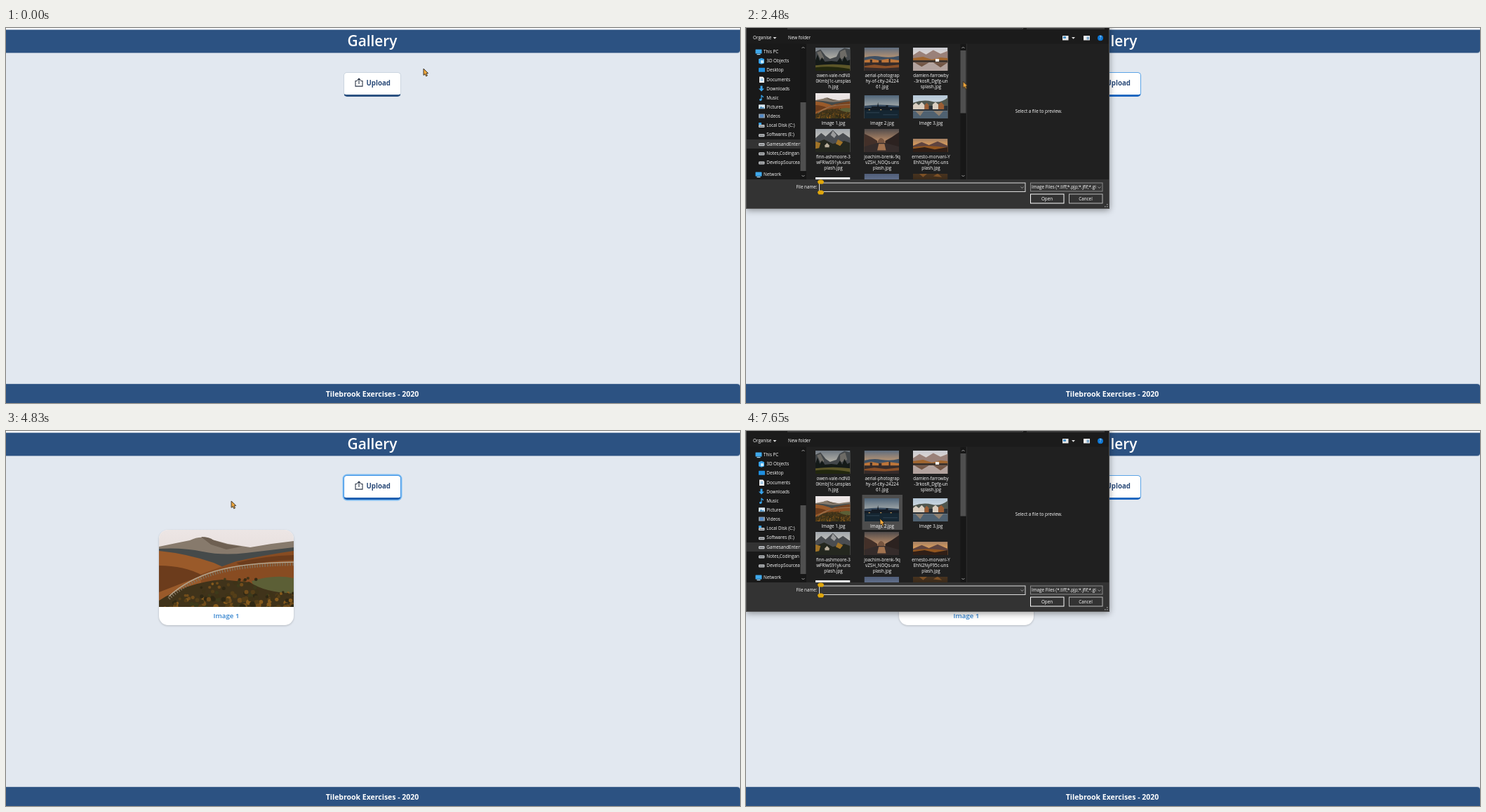
An HTML page for the animation above (8000 ms loop, 1046x535 px).

```html
<!DOCTYPE html>
<html lang="en">
<head>
<meta charset="utf-8">
<title>Gallery</title>
<style>
html, body { margin: 0; width: 100%; height: 100%; overflow: hidden; }
body { position: relative; background: #e2e8f0; font-family: "Open Sans", "Noto Sans", sans-serif; }
body > * { position: absolute; box-sizing: border-box; }
.strip { left: 0; top: 0; width: 100%; height: 3px; background: #f7f9fb; }
header, footer { left: 0; width: 1046px; background: #2c5282; color: #fff; text-align: center; padding-right: 2px; }
header { top: 3px; height: 32px; border-radius: 0 0 4px 0; font: 600 20.8px/30px "Open Sans", sans-serif;
  box-shadow: 0 1px rgba(44,82,130,.5), 0 -1px rgba(44,82,130,.5); }
footer { top: 508px; height: 27px; border-radius: 0 4px 0 0; font: 700 10.5px/28px "Open Sans", sans-serif;
  box-shadow: 0 -1px rgba(44,82,130,.2); }
.btn { left: 481px; top: 63px; width: 82px; height: 35px; border: 1px solid #cbd5e0; border-bottom: 3px solid #2c5282;
  border-radius: 5px; background: #fff; color: #2a4a78; font: 700 9.7px/30px "Open Sans", sans-serif; padding-left: 31.5px; }
.btn svg { position: absolute; left: 15px; top: 7px; }
.card { left: 218px; top: 141px; width: 192px; height: 136px; border-radius: 13px; overflow: hidden; background: #fff;
  box-shadow: 0 1px 3px rgba(0,0,0,.2); color: #3182ce; text-align: center; font: 600 9.7px/26px "Open Sans", sans-serif; }
.card svg { display: block; }
.dialog { left: 0; top: -20px; width: 518px; height: 278px; transform-origin: 259px 95px; box-shadow: 0 2px 9px rgba(0,0,0,.4); }
.dialog svg { display: block; }
.dialog text { font: 6.3px "Open Sans", "Noto Sans", sans-serif; fill: #fff; }
.mouse { left: 0; top: 0; overflow: visible; animation: move 8s linear -10ms infinite; }

/* hard state changes share one 8 s clock */
.on { animation: 8s step-end -10ms infinite; }
.n-btn { animation-name: btn; } .n-card { animation-name: card; } .n-win { animation-name: win; }
.n-blank { animation-name: blank; } .n-ph { animation-name: ph; } .n-late { animation-name: late; }
.n-row { animation-name: row; } .n-sel { animation-name: sel; } .n-unsel { animation-name: unsel; }
.n-hov1 { animation-name: hov1; } .n-hov2 { animation-name: hov2; } .n-caret { animation-name: caret; }
.n-hand { animation-name: hand; } .n-arrow { animation-name: arrow; }

@keyframes btn {
  0% { border-color: #cbd5e0 #cbd5e0 #2c5282; box-shadow: none; }
  9.25% { border-color: #5ba3e6 #5ba3e6 #1f68c0; box-shadow: none; }
  17.25% { border-color: #4295e6 #4295e6 #1f5fb0; box-shadow: 0 0 0 1.5px #7cbcf2; }
  25.625% { border-color: #5ba3e6 #5ba3e6 #1f68c0; box-shadow: none; }
  57.75% { border-color: #4295e6 #4295e6 #1f5fb0; box-shadow: 0 0 0 1.5px #7cbcf2; }
  84.125%, to { border-color: #5ba3e6 #5ba3e6 #1f68c0; box-shadow: none; }
}
@keyframes card { 0% { opacity: 0 } 58.75%, to { opacity: 1 } }
@keyframes win {
  0% { opacity: 0; transform: scale(.979) }
  25.625% { opacity: .6; transform: scale(.979) }
  26.5% { opacity: .845; transform: scale(.9923) }
  27.25% { opacity: 1; transform: none }
  56.5% { opacity: .57; transform: scale(.979) }
  57.75% { opacity: 0; transform: scale(.979) }
  84.125% { opacity: .6; transform: scale(.979) }
  85% { opacity: .845; transform: scale(.9923) }
  86.125%, to { opacity: 1; transform: none }
}
@keyframes blank { 0% { opacity: 1 } 26.5% { opacity: 0 } 84.125% { opacity: 1 } 85%, to { opacity: 0 } }
@keyframes ph { 0% { opacity: 1 } 27.25% { opacity: 0 } 84.125% { opacity: 1 } 86.125%, to { opacity: 0 } }
@keyframes late { 0% { opacity: 0 } 28.25% { opacity: 1 } 84.125% { opacity: 0 } 87.25%, to { opacity: 1 } }
@keyframes row {
  0% { transform: translateY(var(--k)) } 28.25% { transform: none }
  84.125% { transform: translateY(var(--k)) } 87.25%, to { transform: none }
}
@keyframes sel { 0% { opacity: 0 } 54.375% { opacity: 1 } 84.125%, to { opacity: 0 } }
@keyframes unsel { 0% { opacity: 1 } 54.375% { opacity: 0 } 84.125%, to { opacity: 1 } }
@keyframes hov1 { 0% { opacity: 0 } 46.25% { opacity: 1 } 54.375% { opacity: 0 } 88.75% { opacity: 1 } 93.75%, to { opacity: 0 } }
@keyframes hov2 { 0% { opacity: 0 } 36.25% { opacity: 1 } 46.25% { opacity: 0 } 93.75%, to { opacity: 1 } }
@keyframes caret { 0% { opacity: 0 } 40% { opacity: 1 } 46.6% { opacity: 0 } 87.25% { opacity: 1 } 93.75%, to { opacity: 0 } }
@keyframes hand { 0% { opacity: 0 } 9.25% { opacity: 1 } 21.25% { opacity: 0 } 66.5% { opacity: 1 } 78.6%, to { opacity: 0 } }
@keyframes arrow { 0% { opacity: 1 } 9.25% { opacity: 0 } 21.25% { opacity: 1 } 66.5% { opacity: 0 } 78.6%, to { opacity: 1 } }
@keyframes move {
  0%, .875% { transform: translate(595px, 58px) }
  3.75% { transform: translate(590px, 21px) }
  7.5% { transform: translate(558px, 46px) }
  10.25%, 11.25% { transform: translate(539px, 83px) }
  13.25%, 18.25% { transform: translate(540px, 75px) }
  26.5%, 27.25% { transform: translate(378px, 65px) }
  38%, 39% { transform: translate(188px, 96px) }
  41.875%, 44.75% { transform: translate(177px, 129px) }
  48.75%, 52.4% { transform: translate(127px, 117px) }
  52.5%, 54.375% { transform: translate(132px, 119px) }
  55%, 57.75% { transform: translate(132px, 122px) }
  64.25%, 65.5% { transform: translate(577px, 70px) }
  70.25%, 77.1% { transform: translate(541px, 72px) }
  84.125%, 85% { transform: translate(248px, 72px) }
  89.75%, 92% { transform: translate(130px, 115px) }
  95.625%, to { transform: translate(191px, 125px) }
}
</style>
</head>
<body>
<svg id="art" width="0" height="0"></svg>
<div class="strip"></div>
<header>Gallery</header>
<footer>Tilebrook Exercises - 2020</footer>
<div class="btn on n-btn">
  <svg width="12" height="14" fill="none" stroke="#2d3748" stroke-width="1.1"><path d="M3.6 4.5H1v7.6h10V4.5H8.4M6 9V1.2M3.5 3.6L6 1.1 8.5 3.6"/></svg>Upload
</div>
<div class="card on n-card"><svg width="192" height="110"><use href="#valley" width="192" height="110"/></svg>Image 1</div>
<div class="dialog on n-win"><svg id="dlg" width="518" height="278" viewBox="0 -20 518 278"></svg></div>
<svg class="mouse" width="1" height="1" stroke="#2b2620" stroke-width=".9" stroke-linejoin="round">
  <path class="on n-arrow" fill="#f2a83c" d="M0 0V9.4L2.2 7.5 3.7 10.8 5.4 10 4 6.8 6.6 6.5Z"/>
  <path class="on n-hand" fill="#f4b722" d="M-1.2 1.2a1.1 1.1 0 0 1 2.2 0v4l3.2.8q1.4.4 1.1 2l-.9 4.8h-5L-4 8.4q.2-1.5 1.4-.7l1.4 1z"/>
</svg>
<script>
const get = id => document.getElementById(id);
const rect = (x, y, w, h, fill, more = '') => `<rect x="${x}" y="${y}" width="${w}" height="${h}" fill="${fill}" ${more}/>`;
const path = (fill, d, more = '') => `<path fill="${fill}" d="${d}" ${more}/>`;
const line = (color, d, w = 1) => path('none', d, `stroke="${color}" stroke-width="${w}"`);
const text = (x, mid, s, anchor = 'start') => `<text x="${x}" y="${mid + 2.2}" text-anchor="${anchor}">${s}</text>`;
const state = (name, body, style = '') => `<g class="on n-${name}" style="${style}">${body}</g>`;
const use = (id, x, y, w, h) => `<use href="#${id}" x="${x}" y="${y}" width="${w}" height="${h}"/>`;

/* pictures: a sky gradient with flat shapes on it */
const scene = (id, w, h, top, low, body) =>
  `<linearGradient id="${id}-sky" x2="0" y2="1"><stop stop-color="${top}"/><stop offset=".6" stop-color="${low}"/></linearGradient>
  <symbol id="${id}" viewBox="0 0 ${w} ${h}" preserveAspectRatio="xMidYMid slice">${rect(0, 0, w, h, `url(#${id}-sky)`)}${body}</symbol>`;
const thumb = (id, top, low, ...layers) => scene(id, 48, 33, top, low, layers.map(l => path(...l)).join(''));

let seed = 7;
const rnd = () => (seed = seed * 16807 % 2147483647) / 2147483647;

function trees(n) {
  const tones = ['#2e2714', '#3f3318', '#574019', '#77501c', '#90601f', '#3d3b1c'];
  let out = '';
  for (let i = 0; i < n; i++) {
    const x = rnd() * 192;
    const edge = x > 140 ? 106 : 74 + 49 * ((192 - x) / 178) ** 2.2;
    const depth = rnd();
    const tone = tones[Math.floor(rnd() * 6)];
    out += `<circle cx="${x.toFixed(1)}" cy="${(edge + depth * (144 - edge)).toFixed(1)}" r="${(1.8 + depth * 3).toFixed(1)}" fill="${tone}"/>`;
  }
  return `<g opacity=".9">${out}</g>`;
}

const bridge = 'M14 112Q40 88 80 76T192 63';
get('art').innerHTML =
  scene('valley', 192, 144, '#efe9e9', '#e2d8d4',
    path('#877a6c', 'M0 41L24 36 44 32Q60 24 76 31L98 37 130 42 160 37 192 33V80H0Z') +
    path('#6e6052', 'M60 27Q72 27 78 32L98 38 118 41 96 45 74 38Z') +
    path('#454a4a', 'M0 44Q34 42 62 48T124 50L192 42V90H0Z') +
    path('#9a5a2a', 'M0 47Q40 51 78 64L100 74V144H0Z') +
    path('#884c22', 'M192 47Q150 53 110 62L60 80V144H192Z') +
    path('#6c3c1c', 'M0 68Q36 68 62 82L0 106ZM110 64Q150 54 192 53V60Q150 61 120 70Z') +
    path('#5c5f36', 'M132 90Q165 80 192 86V112H140Z') +
    path('#40331a', 'M0 118Q40 92 90 88L130 92Q150 106 192 108V144H0Z') +
    `<g transform="translate(0 3)">${path('none', bridge, 'stroke="#80715c" stroke-width="4.5" stroke-dasharray="1.4 2.2"')}</g>` +
    line('#b5a58d', bridge, 1.4) + trees(230)) +
  thumb('cliff', '#6d7680', '#c2bdb0', ['#43474a', 'M0 6L7 3 14 12 20 16 29 13 33 5 40 1 48 3V33H0Z'], ['#6d6b66', 'M2 7L7 5 12 15 8 19ZM34 6L41 3 44 13 34 17Z'],
    ['#141a18', 'M0 18L3 10 6 19 9 14 13 20 22 19 30 20 34 14 37 20 40 12 44 19 48 17V27H0Z'], ['#5c5628', 'M0 25Q24 22 48 25V33H0Z'], ['#22270f', 'M0 28Q20 25 48 30V33H0Z']) +
  thumb('city', '#5b6c80', '#d8a06b', ['#3f5063', 'M0 14Q12 11 24 13T48 12V22H0Z'], ['#bd7539', 'M0 18L10 16 20 18 33 16 48 18V24H0Z'],
    ['#352b2a', 'M0 21H8V17H11V21H20V18H24V21H34V16H36V21H48V33H0Z'], ['#8a5029', 'M0 26L14 24 30 26 48 24V28L28 29 0 28Z']) +
  thumb('lake', '#c9cbd2', '#eddcd0', ['#9a8179', 'M0 11L9 5 18 10 28 4 38 9 48 5V20H0Z'], ['#a0662f', 'M0 15L14 13 26 17 38 14 48 15V20H0Z'],
    ['#40352e', 'M0 18H48V21H0Z'], ['#b3a39e', 'M0 21H48V33H0Z'], ['#735645', 'M2 21H22L12 27ZM28 21H48L38 28Z'], ['#f2eee9', 'M31 16H36V20H31Z']) +
  thumb('harbor', '#4d6378', '#b3b6b2', ['#33465a', 'M0 15Q20 12 48 15V21H0Z'], ['#141c25', 'M0 18H10V16H18L19 10 20 16H30V14H33V17H48V22H0Z'],
    ['#152632', 'M0 21H48V33H0Z'], ['#2c4252', 'M3 24H21V25H3ZM26 27H46V28H26Z'], ['#c49a5a', 'M6 20H8V21H6ZM22 20H24V21H22ZM36 20H38V21H36Z']) +
  thumb('houses', '#b3c6d6', '#dce2e6', ['#4f564e', 'M0 11Q14 6 26 9T48 4V20H0Z'], ['#d9cec0', 'M0 14L4 11 8 14 12 10 16 14V21H0ZM27 13L31 10 35 13V21H27Z'],
    ['#9a5d34', 'M16 14L19 11 22 14V21H16ZM35 13L39 10 43 14V21H35Z'], ['#2a3036', 'M22 15H27V21H22ZM43 15H48V21H43ZM0 20H48V22H0Z'],
    ['#4f6171', 'M0 22H48V33H0Z'], ['#90806f', 'M3 22H15L10 29ZM28 22H42L36 29Z']) +
  thumb('alps', '#9fa5ab', '#d5d0c6', ['#4a4d51', 'M0 13L8 6 14 11 24 2 32 10 38 6 48 13V33H0Z'], ['#9a9b9c', 'M24 3L29 9 26 13 21 9Z'],
    ['#24271f', 'M0 20L12 15 24 21 40 17 48 20V33H0Z'], ['#a07327', 'M31 15L38 19 34 24 28 21ZM0 18L7 20 5 27 0 28Z'], ['#b9ae9c', 'M13 23L16 20 19 23V26H13Z']) +
  thumb('canal', '#4e4a4b', '#c4926a', ['#433029', 'M0 7L10 12 18 17V28H0Z'], ['#2c2220', 'M48 5L38 12 29 17V28H48Z'], ['#775540', 'M19 17Q23 9 28 17V20H18Z'],
    ['#352c2b', 'M0 25L18 20H29L48 25V33H0Z'], ['#a27350', 'M20 21H28L30 30H18Z']) +
  thumb('dusk', '#7b6a6c', '#eda757', ['#5f443f', 'M0 17L12 12 22 16 34 11 48 17V33H0Z'], ['#93561f', 'M0 19Q20 15 48 20V33H0Z'], ['#301f17', 'M0 21L16 19 30 22 48 19V33H0Z']) +
  thumb('snow', '#eceef0', '#c3c8cc') + thumb('haze', '#4f5d78', '#7785a0') +
  thumb('forest', '#4a341f', '#241d14', ['#7d5126', 'M8 0L14 5 20 0ZM28 4L34 0 40 5Z']);

/* dialog */
const rows = [
  [17, [['cliff', 28, 33, 'owen-vale-ndN0', '0KmbJ1c-unsplas', 'h.jpg'],
        ['city', 28, 33, 'aerial-photograp', 'hy-of-city-24224', '61.jpg'],
        ['lake', 28, 33, 'damien-farrowby', '-3rkosR_Dgfg-un', 'splash.jpg']]],
  [29, [['valley', 93, 36, 'Image 1.jpg'], ['harbor', 96, 33, 'Image 2.jpg'], ['houses', 96, 33, 'Image 3.jpg']]],
  [46, [['alps', 144, 33, 'finn-ashmoore-3', 'wFRIwS91yk-uns', 'plash.jpg'],
        ['canal', 144, 33, 'joachim-brenk-9q', 'vZSH_NOQs-uns', 'plash.jpg'],
        ['dusk', 158, 19, 'ernesto-morvani-Y', 'EhN2NyF95c-uns', 'plash.jpg']]],
  [60, [['snow', 213, 33], ['haze', 208, 33], ['forest', 208, 33]]]
];
const file = ([id, y, h, ...names], col) => use(id, 99 + col * 69.5, y, 49.5, h) +
  names.map((s, i) => text(124.5 + col * 69.5, y + h + 6.7 + i * 8, s, 'middle')).join('');
const files = rows.map(([k, list]) => state('row', list.map(file).join(''), `--k:${k}px`)).join('');

const places = ['This PC', '3D Objects', 'Desktop', 'Documents', 'Downloads', 'Music', 'Pictures', 'Videos',
  'Local Disk (C:)', 'Softwares (E:)', 'GamesandEntert', 'Notes,Codingan', 'DevelopSourcea', 'Network'];
const placeY = i => i == 13 ? 209 : 34 + i * 13.13;
const outer = i => i % 13 == 0;
const labels = places.map((s, i) => text(outer(i) ? 25 : 29.3, placeY(i), s)).join('');
const drive = y => rect(18, y - 1, 8.5, 4, '#c8ccd0', 'rx="1"') + rect(19, y + .6, 6.5, 1, '#555');
const page = y => path('#f4f4f4', `M19 ${y - 4}h5l2 2v6.5h-7z`);
const screen = (x, y, fill) => rect(x, y - 3.5, 9, 6, fill, 'rx=".6"');
const icons = places.map((s, i) => {
  const y = placeY(i), blue = '#38a3ea';
  if (outer(i)) return screen(13.5, y, '#3fa9ec') + rect(15.5, y + 3, 5, 1.2, '#b9dcf3');
  if (i > 7) return drive(y) + (i == 8 ? rect(18, y - 4, 4, 3, blue) : '');
  return [0, path(blue, `M18 ${y - 3}l4-1.5 4 1.5v6l-4 1.5-4-1.5z`) + rect(21, y - 1, 4, 4, '#c9eafc'),
    screen(18, y, '#1f8fe0'), page(y) + rect(20.5, y - 1, 4, 1, '#5aa0d8') + rect(20.5, y + 1, 4, 1, '#5aa0d8'),
    path(blue, `M20.5 ${y - 4}h3v4h2.5l-4 4-4-4h2.5z`),
    line(blue, `M22 ${y + 3}v-7q1 2 3 3`, 1.2) + `<circle cx="20.7" cy="${y + 2.7}" r="1.7" fill="${blue}"/>`,
    screen(18, y, '#dbe9f3') + path('#3b86bd', `M19 ${y + 2}l2.5-3 2 2 1-1 2 2z`),
    screen(18, y, '#8a9aa8') + rect(20, y - 2.5, 5, 4, '#4f88c8')][i];
}).join('');

const chevron = (x, y, d, w = 2) => line('#bbb', `M${x - w} ${y - d}L${x} ${y + d}L${x + w} ${y - d}`, .8);
const bar = (x, top, h) => rect(x, 23, 8, 193, '#171717') + rect(x, top, 8, h, '#4f4f4f') + chevron(x + 4, 28, -1) + chevron(x + 4, 211, 1);
const field = (x, y, w, h, fill, edge) => rect(x + .5, y + .5, w - 1, h - 1, fill, `stroke="${edge}"`);
const boxes = [[104, 220.5, 294.5, 13.5], [405, 220.5, 103.5, 13], [405, 236.5, 48.5, 14], [460, 236.5, 48.5, 14]];
const hover = (x, fill) => rect(x, 91, 57.5, 50, fill);
const knob = y => path('#e0a70c', `M102 ${y}a4.5 3.5 0 0 1 9 0l-1.5 2.5h-6z`);

get('dlg').innerHTML =
  `<clipPath id="list"><path d="M0 22H518V216H0Z"/></clipPath>` +
  rect(0, -20, 518, 278, '#202020') + rect(0, -20, 518, 42.5, '#1b1b1b') + rect(0, 22.5, 86, 193.5, '#191919') +
  line('#666', 'M59 1H394.5V-9M400 1H511', .8) +
  rect(481, 11, 9, 6.5, '#eee') + rect(485.5, 12.5, 3.5, 4, '#7ea9cc') +
  `<circle cx="505" cy="14.2" r="4" fill="#0f78d4"/>` + text(505, 14.2, '?', 'middle') +
  state('late', text(10, 14.2, 'Organise') + path('#ddd', 'M38.5 13h5l-2.5 2.8z') + text(60, 14.2, 'New folder') +
    rect(451, 11, 8.5, 6.5, '#e8e8e8') + rect(452, 12, 4, 3, '#4c93c8') + path('#ddd', 'M464 13h5l-2.5 2.8z')) +
  rect(0, 159, 78, 13, '#333') + labels + state('late', icons) +
  `<g class="on n-ph">${[8, 9, 10, 11, 12].map(i => page(placeY(i))).join('')}</g>` +
  bar(77.5, 106, 98) +
  `<g clip-path="url(#list)">${state('hov1', hover(96.5, '#4d4d4d')) + state('hov2', hover(165.5, '#4d4d4d')) +
    state('sel', hover(96.5, '#777')) + files}</g>` +
  bar(305.5, 32, 89.5) + rect(314, 22.5, 1, 193.5, '#2c2c2c') +
  state('unsel', text(417, 119, 'Select a file to preview.', 'middle')) +
  state('sel', use('valley', 328.5, 50.5, 181, 136)) +
  rect(0, 216, 518, 42, '#333') + text(101.5, 227, 'File name:', 'end') +
  field(...boxes[0], '#383838', '#ddd') + chevron(393.5, 227.5, 1) +
  field(...boxes[1], '#383838', '#8a8a8a') + text(407, 227, 'Image Files (*.tiff;*.pjp;*.jfif;*.gi') + chevron(503.5, 227.5, 1) +
  field(...boxes[2], '#333', '#fff') + text(429, 243.5, 'Open', 'middle') +
  field(...boxes[3], '#333', '#bbb') + text(484, 243.5, 'Cancel', 'middle') +
  path('#999', 'M514 251h1.5v1.5H514zM514 254h1.5v1.5H514zM511 254h1.5v1.5H511z') +
  state('sel', text(108, 227, 'Image 1.jpg')) +
  state('late', state('unsel', knob(220) + knob(235) + state('caret', rect(106, 222, 1, 11, '#fff')))) +
  state('ph', rect(0, -20, 518, 26.5, '#f2f2f2') + boxes.map(b => rect(...b, '#fff')).join('') +
    rect(71.5, 223, 30, 8, '#fff') + rect(508, 249, 10, 9, '#fff')) +
  state('blank', rect(0, -20, 518, 236, '#fff') + rect(305.5, 33, 9, 174, '#1a1a1a') + rect(305.5, 33, 9, 89, '#4d4d4d')) +
  line('#5a5a5a', 'M.5 -20V257.5H517.5V-20', .8);
</script>
</body>
</html>
```
